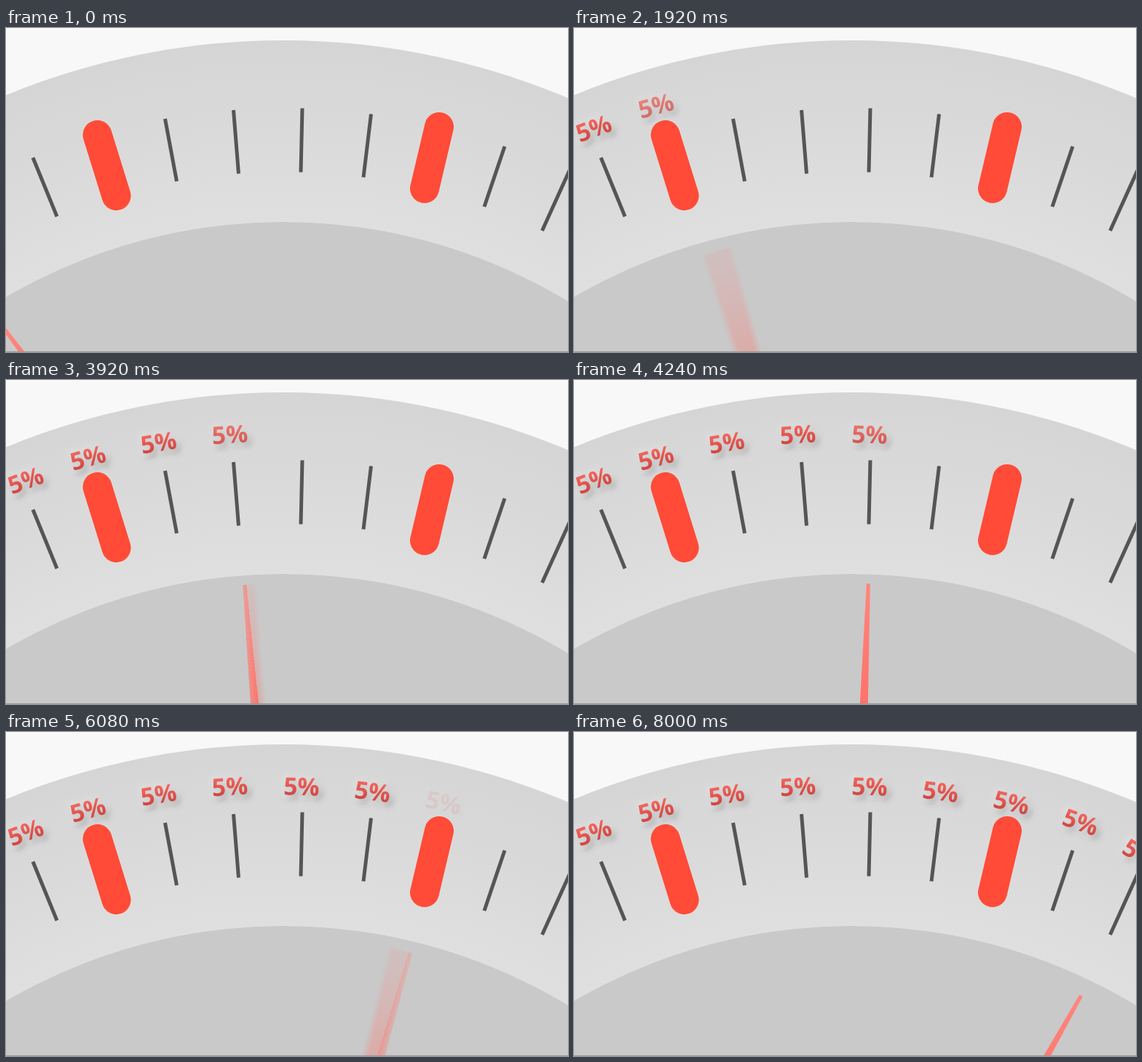
Write an HTML page with a canvas that moves like this. It is 772 px wide and 446 px high and loops after 8480 ms.

```html
<!DOCTYPE html>
<html lang="en">
<head>
<meta charset="utf-8">
<title>Dial</title>
<style>
  html, body { margin: 0; width: 100%; height: 100%; overflow: hidden; background: #f8f8f8; }
  svg, canvas { position: absolute; left: 0; top: 0; width: 772px; height: 446px; }
  .label { font: bold 33.5px "Open Sans", "Noto Sans", sans-serif; text-anchor: middle; fill: url(#ink); }
  .floor { position: absolute; left: 0; top: 445px; width: 772px; height: 1px; background: #999; }
</style>
</head>
<body>
<svg viewBox="0 0 772 446">
  <defs>
    <radialGradient id="ring" gradientUnits="userSpaceOnUse" cx="381" cy="1017" r="1000">
      <stop offset=".75" stop-color="#dfdfdf"/>
      <stop offset="1" stop-color="#d5d5d5"/>
    </radialGradient>
    <linearGradient id="ink" x1="0" y1="0" x2="0" y2="1">
      <stop offset=".25" stop-color="#f2675e"/>
      <stop offset=".8" stop-color="#cf4540"/>
    </linearGradient>
    <filter id="lift" x="-50%" y="-50%" width="200%" height="200%">
      <feDropShadow dx="-3" dy="-3" stdDeviation="4" flood-color="#fff" flood-opacity=".3"/>
      <feDropShadow dx="4" dy="5" stdDeviation="4" flood-color="#000" flood-opacity=".28"/>
    </filter>
  </defs>
  <circle cx="381" cy="1017" r="1000" fill="url(#ring)"/>
  <circle cx="381" cy="1021" r="754" fill="#c9c9c9"/>
  <path fill="none" stroke="#555" stroke-width="5" d="M37 178.500L70 259.500M218.500 125L234.500 211M312.500 113L319.500 200.500M407 110.500L405 198.500M501.500 118.500L491 205.500M685 163L657 246M774 196L736.500 279"/>
  <path fill="none" stroke="#ff4b37" stroke-width="40" stroke-linecap="round" d="M125.500 147L151.500 231M595 136L575 221"/>
  <g id="labels"></g>
</svg>
<canvas id="needle" width="772" height="446"></canvas>
<div class="floor"></div>
<script>
const LOOP = 8480, STEP = 80, MOVE = 160, SAMPLES = 32;
const PIVOT = { x: 381, y: 923 }, TIP = 643;

// first and last picture change, start of the needle's move, label opacity while resting
const moves = [
  [80, 240, 80, .72], [960, 1200, 960, .74], [1920, 2160, 1920, .8],
  [2960, 3200, 2992, .87], [3920, 4240, 3971, .88], [4960, 5360, 4968, .92],
  [5920, 6240, 5978, .88], [6720, 7040, 6760, .9], [7680, 8000, 7720, 1]
].map(([first, last, start, rest]) => ({ first, last, start, rest }));

const clamp = v => Math.max(0, Math.min(1, v));
const stop = k => k ? 29.4 - 6.83 * (9 - k) : -37;

const spots = [
  [27, 138, -20.5], [112.5, 107, -15.4], [209.5, 86, -9], [307.5, 75, -3.5], [406, 75, 2],
  [503.5, 82, 7.5], [601, 97, 13], [696, 124, 19.5], [778, 168, 30]
];
const group = document.getElementById('labels');
const labels = spots.map(([x, y, turn]) => {
  const box = document.createElementNS('http://www.w3.org/2000/svg', 'g');
  const text = document.createElementNS('http://www.w3.org/2000/svg', 'text');
  box.setAttribute('filter', 'url(#lift)');
  text.setAttribute('class', 'label');
  text.setAttribute('transform', `translate(${x} ${y}) rotate(${turn})`);
  text.setAttribute('y', 12);
  text.textContent = '5%';
  box.append(text);
  group.append(box);
  return box;
});

const ctx = document.getElementById('needle').getContext('2d');
const paint = ctx.createLinearGradient(0, -TIP, 0, -470);
paint.addColorStop(0, '#ff867e');
paint.addColorStop(1, '#ff7168');

function angleAt(t) {
  return moves.reduce((a, m, i) =>
    a + (stop(i + 1) - stop(i)) * clamp((t - m.start) / MOVE), stop(0));
}

// the needle is averaged over one step, which smears it while it moves
function drawNeedle(t) {
  ctx.setTransform(1, 0, 0, 1, 0, 0);
  ctx.clearRect(0, 0, 772, 446);
  const still = angleAt(t) === angleAt(t + STEP);
  const n = still ? 1 : SAMPLES;
  ctx.globalCompositeOperation = 'lighter';
  ctx.globalAlpha = 1 / n;
  ctx.fillStyle = paint;
  for (let i = 0; i < n; i++) {
    ctx.setTransform(1, 0, 0, 1, PIVOT.x, PIVOT.y);
    ctx.rotate(angleAt(t + STEP * (i + .5) / n) * Math.PI / 180);
    ctx.beginPath();
    ctx.moveTo(-2.5, -TIP);
    ctx.lineTo(2.5, -TIP);
    ctx.lineTo(6, -450);
    ctx.lineTo(-6, -450);
    ctx.fill();
  }
}

function labelOpacity(i, t) {
  const m = moves[i], next = moves[i + 1];
  if (next && t > next.first) return 1;
  const arrive = m.start + MOVE;
  return m.rest * clamp((t + STEP - arrive) / (m.last + STEP - arrive));
}

let shown = -1;
function frame(now) {
  const t = Math.floor(now % LOOP / STEP) * STEP;
  if (t !== shown) {
    shown = t;
    drawNeedle(t);
    labels.forEach((el, i) => el.setAttribute('opacity', labelOpacity(i, t)));
  }
  requestAnimationFrame(frame);
}
const begin = performance.now();
const tick = () => frame(Math.max(0, performance.now() - begin));
frame = (draw => () => draw(Math.max(0, performance.now() - begin)))(frame);
tick();
</script>
</body>
</html>
```
